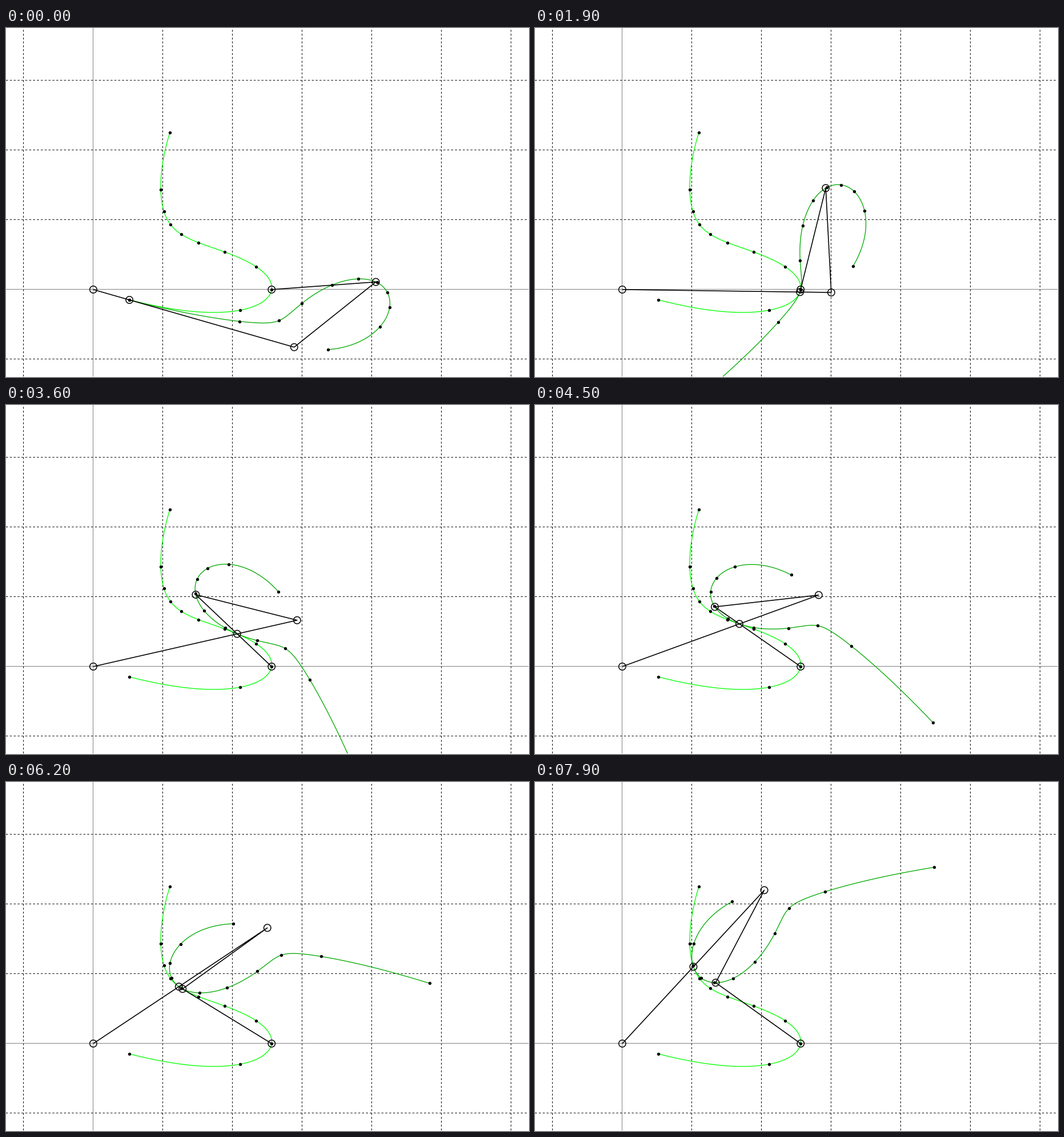
A matplotlib script that plays this animation: 916x611 px, repeating every 8 s.

```python
import numpy as np
import matplotlib.pyplot as plt
from matplotlib.animation import FuncAnimation

# Four-bar linkage with its fixed and moving centrodes.
W, H, DPI = 916, 611, 64
PX = 72 / DPI                      # one pixel in points
UNIT = 122
ORIGIN = 152.9 + 457.9j
CRANK, COUPLER, GROUND = 3.0, 1.5, 2.56
START, STOP, STEP = -16, 64, 0.8   # crank angle in degrees
FRAMES = 80


def linkage(deg):
    """Crank pin, coupler pin and instant centre as complex numbers."""
    arm = np.exp(1j * np.radians(deg))
    c = CRANK * arm
    gap = GROUND - c
    half = abs(gap) / 2
    d = c + gap / 2 - 1j * gap / abs(gap) * np.sqrt(COUPLER**2 - half**2)
    rod = d - GROUND
    pole = arm * GROUND * rod.imag / (rod.imag * arm.real - rod.real * arm.imag)
    return c, d, pole


def moving(deg):
    """Pole path as seen from the coupler."""
    c, d, pole = linkage(deg)
    return (pole - c) / (d - c)


def to_px(z):
    p = ORIGIN + UNIT * np.conj(z)
    return p.real, p.imag


fig = plt.figure(figsize=(W / DPI, H / DPI), dpi=DPI, facecolor="white")
ax = fig.add_axes([0, 1 / H, 1, (H - 1) / H])
ax.set_xlim(0, W)
ax.set_ylim(H - 1, 0)
ax.axis("off")


def line(x, y, color, width, z, **kw):
    return ax.plot(x, y, color=color, lw=width * PX, zorder=z, snap=False,
                   solid_capstyle="butt", solid_joinstyle="round", **kw)[0]


def dots(z):
    return ax.scatter([], [], s=(5.4 * PX) ** 2, c="black", lw=0, zorder=z)


def grid_line(x, y, axis):
    if axis:
        line(x, y, "#808080", 1, 1)
    else:
        line(x, y, "black", 1, 1, ls=(0, (3.39, 3.39)))


for k in range(-1, 7):
    x = 152.5 + UNIT * k
    grid_line([x, x], [610, 0], k == 0)
for k in range(-1, 4):
    y = 457.5 - UNIT * k
    grid_line([0, 915], [y, y], k == 0)

fine = np.linspace(START, STOP, 801)
marks = np.linspace(START, STOP, 11)
body_curve, body_marks = moving(fine), moving(marks)

line(*to_px(linkage(fine)[2]), "#00ff00", 1.3, 2)
dots(5).set_offsets(np.column_stack(to_px(linkage(marks)[2])))

body_line = line([], [], "#00aa00", 1.3, 3)
body_dots = dots(5)
bars = line([], [], "black", 1.6, 4)
joints = ax.scatter([], [], s=(12.4 * PX) ** 2, facecolors="none",
                    edgecolors="black", lw=1.5 * PX, zorder=6)


def draw(i):
    c, d, pole = linkage(START + STEP * i)
    body_line.set_data(*to_px(c + (d - c) * body_curve))
    body_dots.set_offsets(np.column_stack(to_px(c + (d - c) * body_marks)))

    # Bars reach on to the pole when it lies beyond the coupler pin.
    bars.set_data(*to_px(np.array([0, c, d, GROUND])))
    joints.set_offsets(np.column_stack(to_px(np.array([0, GROUND, c, d, pole]))))
    return body_line, body_dots, bars, joints


anim = FuncAnimation(fig, draw, frames=FRAMES, interval=100,
                     init_func=lambda: draw(0), repeat=True, repeat_delay=0)
plt.show()
```
